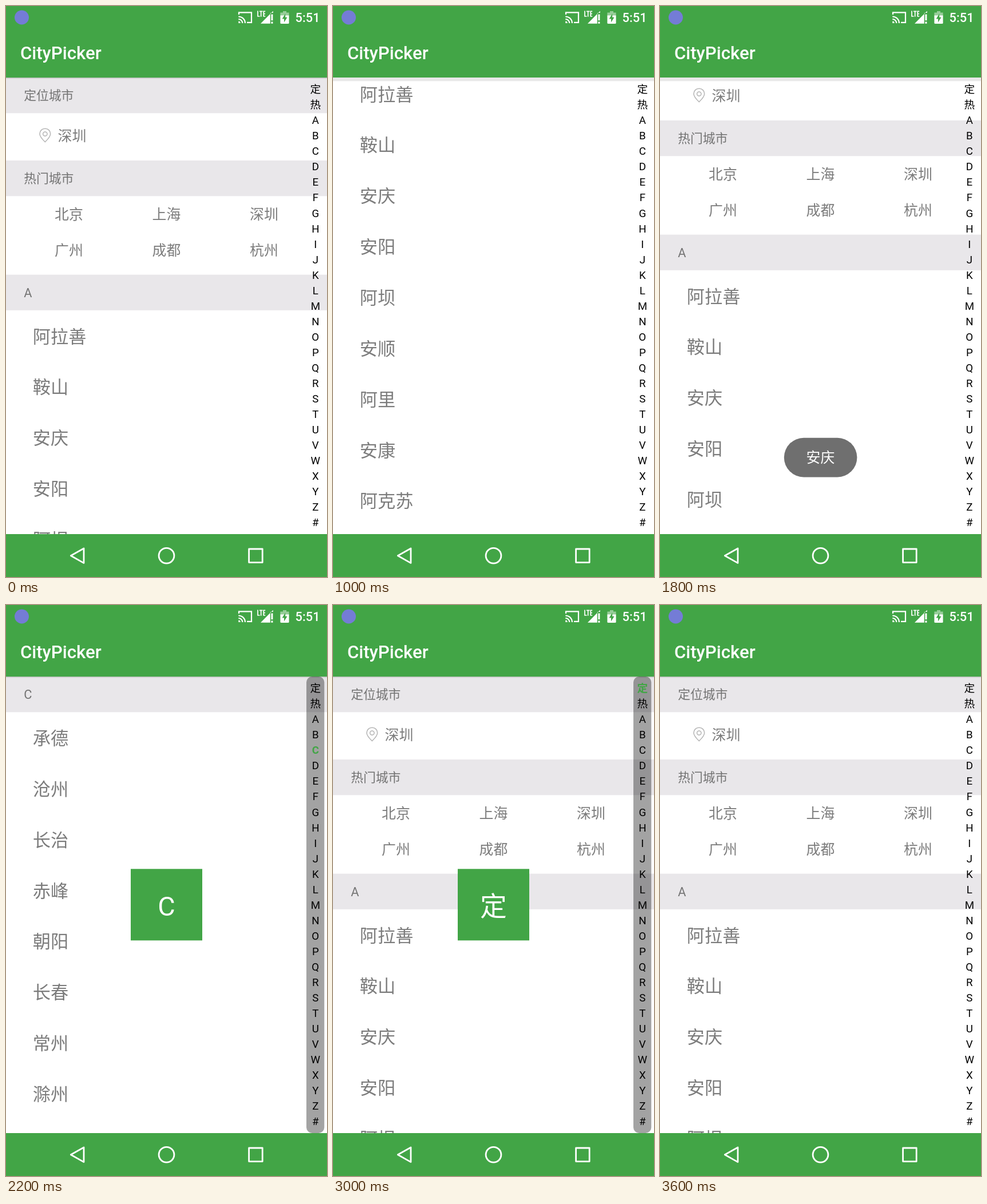
An HTML page that plays this animation: 561x998 px, repeating every 4000 ms.

```html
<!DOCTYPE html>
<html lang="zh-CN">
<head>
<meta charset="utf-8">
<title>CityPicker</title>
<style>
  html, body { margin: 0; width: 100%; height: 100%; overflow: hidden; background: #fff; }
  svg { display: block; width: 100vw; height: 100vh; }
  text { font-family: Roboto, "Noto Sans CJK SC", "Noto Sans CJK", sans-serif; white-space: pre; }
  .row { font-size: 31.2px; fill: #7c7c7c; }
  .city { font-size: 24.9px; fill: #7c7c7c; }
  .head { font-size: 21.8px; fill: #737373; }
  .index { font-size: 18.7px; text-anchor: middle; fill: #000; }
  .index .on { fill: #42a546; font-weight: 700; }
  .mid { text-anchor: middle; }
  .line { fill: none; stroke: #fff; }
</style>
</head>
<body>
<svg viewBox="0 0 561 998" preserveAspectRatio="none">
  <rect width="561" height="998" fill="#fff"/>
  <g id="list"></g>
  <rect id="strip" y="125" width="561" height="6.3" fill="#e8e8e8"/>
  <g id="shadow">
    <rect y="125" width="561" height="1.2" fill="#b3bdb4"/>
    <rect y="126.2" width="561" height="1" fill="#d6d5d7"/>
  </g>
  <rect id="rail" x="525" y="125" width="31.3" height="798" rx="10" fill="#000" fill-opacity=".36"/>
  <g id="index" class="index"></g>

  <g id="dialog">
    <rect x="218" y="461.3" width="125" height="125" fill="#42a546"/>
    <text id="big" class="mid" x="280.5" y="542.5" font-size="46.8" fill="#fff"></text>
  </g>
  <g id="toast">
    <rect x="216.8" y="754.8" width="127.6" height="68.6" rx="34.3" fill="#6f6f6f"/>
    <text id="toastText" class="mid" x="280.5" y="798.4" font-size="24.9" fill="#fff"></text>
  </g>

  <!-- top bar -->
  <rect width="561" height="125" fill="#42a546"/>
  <circle cx="27.5" cy="20" r="12.5" fill="#747cd6"/>
  <g class="line" stroke-width="2.2">
    <path d="M407 15V11.3H429V28.8H421"/>
    <path d="M406.3 18.5A11.6 11.6 0 0 1 418 30M406.3 23A7 7 0 0 1 413.3 30"/>
  </g>
  <path d="M406.3 26.6a3.4 3.4 0 0 1 3.4 3.4h-3.4z" fill="#fff"/>
  <path class="line" stroke-width="1.7" d="M440 8.6V18H443.6M443 9.4H448.4M445.7 9.4V18.8M453.2 9.4H450.2V18H453.2M450.2 13.6H453"/>
  <path d="M466.8 8.8V12H461.8V30.8H445z" fill="#fff"/>
  <path d="M463.4 14.5H466.4V25.3H463.4zM463.4 27.6H466.4V30.8H463.4z" fill="#fff"/>
  <path d="M484 9H490V11.4H494.6V17H479.4V11.4H484z" fill="#fff" fill-opacity=".45"/>
  <path d="M479.4 16.5H494.6V29.5Q494.6 31 493 31H481Q479.4 31 479.4 29.5z" fill="#fff"/>
  <path d="M488.2 13.5L482.6 22.6H486V28.6L491.6 19.8H488.2z" fill="#42a546"/>
  <text x="505.6" y="28" font-size="21.8" font-weight="500" fill="#fff">5:51</text>
  <text x="24.9" y="93.4" font-size="31.2" font-weight="500" fill="#fff">CityPicker</text>

  <!-- navigation bar -->
  <rect y="923" width="561" height="75" fill="#42a546"/>
  <g class="line" stroke-width="2.8" stroke-linejoin="round">
    <path d="M113.3 960.8L136 948V973.6z"/>
    <circle cx="280.5" cy="960.8" r="13.4"/>
    <rect x="424.6" y="949" width="23.6" height="23.6"/>
  </g>
</svg>
<script>
const $ = id => document.getElementById(id);
const TOP = 125, HEAD = 62.3, ROW = 88.85, STEP = 200, LOOP = 4000;
const letters = ['定', '热', ...'ABCDEFGHIJKLMNOPQRSTUVWXYZ#'];
const hot = ['北京', '上海', '深圳', '广州', '成都', '杭州'];
const cities = {
  A: '阿拉善 鞍山 安庆 安阳 阿坝 安顺 阿里 安康 阿克苏',
  C: '承德 沧州 长治 赤峰 朝阳 长春 常州 滁州',
  H: '邯郸 衡水 呼和浩特 呼伦贝尔 葫芦岛 哈尔滨 鹤岗 黑河',
  J: '晋城 晋中 锦州 吉林 鸡西 佳木斯 嘉兴 金华',
  L: '廊坊 临汾 吕梁 辽阳 辽源 连云港 丽水 六安'
};

// Each state holds from its time until the next one.
const states = [
  { at: 0, scroll: 0 },
  { at: 200, scroll: 0, toast: '深圳' },
  { at: 600, scroll: 420, toast: '深圳' },
  { at: 800, scroll: 423, toast: '深圳' },
  { at: 1000, scroll: 423 },
  { at: 1200, scroll: 423, toast: '安庆' },
  { at: 1600, scroll: 250, toast: '安庆' },
  { at: 1800, scroll: 70, toast: '安庆' },
  { at: 2000, scroll: 0 },
  { at: 2200, press: 'C' },
  { at: 2400, press: 'J' },
  { at: 2600, press: 'L' },
  { at: 2800, press: 'H' },
  { at: 3000, scroll: 0, press: '定' },
  { at: 3200, scroll: 145 },
  { at: 3400, scroll: 70 },
  { at: 3600, scroll: 0 }
];

const text = (cls, x, y, s) => `<text class="${cls}" x="${x}" y="${y.toFixed(2)}">${s}</text>`;
const header = (y, s) =>
  `<rect y="${y}" width="561" height="${HEAD}" fill="#e9e7ea"/>` + text('head', 31.2, y + 39.4, s);

const section = (y, letter) => header(y, letter) + cities[letter].split(' ')
  .map((name, i) => text('row', 46.8, y + 119 + i * ROW, name)).join('');

const pin = y => `<g transform="translate(68.3 ${y})" fill="none" stroke="#b4b4b4" stroke-width="1.5">
  <path d="M0 11.6C-3 8.6 -9.4 2.6 -9.4 -2.6A9.4 9.2 0 0 1 9.4 -2.6C9.4 2.6 3 8.6 0 11.6z"/>
  <circle cy="-2.4" r="3.7"/></g>`;

function home(scroll) {
  const y = TOP - scroll;
  const grid = hot.map((name, i) =>
    text('city mid', 110 + i % 3 * 170.5, y + 248.4 + Math.floor(i / 3) * 62.3, name));
  return header(y, '定位城市') + pin(y + 101) + text('city', 90.6, y + 111, '深圳') +
    header(y + 145, '热门城市') + grid.join('') + section(y + 344.6, 'A');
}

$('index').innerHTML = letters.map((s, i) => text('', 540.8, 152.2 + i * 27.04, s)).join('');
const marks = [...$('index').children];
const show = (id, on) => { $(id).style.display = on ? '' : 'none'; };

function draw({ scroll, press, toast }) {
  const pinned = scroll === undefined || scroll === 0 || scroll === 145;
  $('list').innerHTML = scroll === undefined ? section(TOP, press) : home(scroll);
  show('strip', !pinned);
  show('shadow', pinned);
  show('rail', press);
  show('dialog', press);
  show('toast', toast);
  $('big').textContent = press || '';
  $('toastText').textContent = toast || '';
  marks.forEach((m, i) => m.setAttribute('class', letters[i] === press ? 'on' : ''));
}

let current;
const start = performance.now();
function tick() {
  const t = (performance.now() - start) % LOOP;
  const state = states.findLast(s => s.at <= t);
  if (state !== current) draw(current = state);
  requestAnimationFrame(tick);
}
tick();
</script>
</body>
</html>
```
